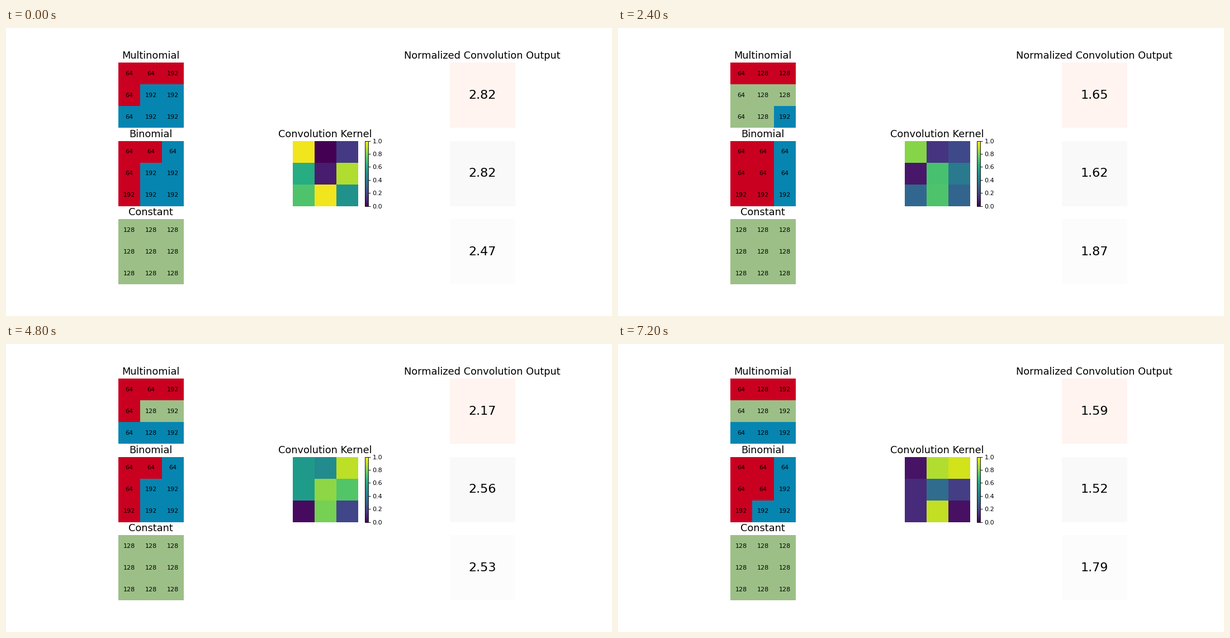
A matplotlib script that plays this animation: 1084 px wide and 517 px high, repeating every 8 s.

```python
import matplotlib.pyplot as plt
import numpy as np
from matplotlib.animation import FuncAnimation
from matplotlib.colors import ListedColormap

WIDTH, HEIGHT, DPI = 1084, 517, 80
INTERVAL, FRAMES, FRAMES_PER_STEP = 400, 20, 3
PALETTE = ListedColormap(["#ca0020", "#9cbf87", "#0685b1"])

# Each draw: multinomial low and middle counts, binomial low count, kernel in percent
DRAWS = [
    (4, 0, 4, [98, 0, 17, 62, 8, 88, 72, 98, 51]),
    (4, 3, 4, [73, 82, 20, 99, 15, 29, 16, 37, 49]),
    (3, 5, 6, [82, 15, 22, 6, 71, 41, 33, 72, 32]),
    (5, 2, 7, [90, 3, 34, 9, 50, 81, 30, 15, 34]),
    (4, 2, 4, [54, 48, 90, 55, 83, 73, 3, 79, 21]),
    (3, 3, 2, [99, 9, 86, 57, 37, 34, 77, 31, 66]),
    (3, 3, 5, [5, 88, 93, 12, 35, 18, 12, 91, 4]),
]

plt.rcParams["font.family"] = "DejaVu Sans"
fig = plt.figure(figsize=(WIDTH / DPI, HEIGHT / DPI), dpi=DPI, facecolor="white")


def panel(index, size, cmap, vmax, title=""):
    """Square heat map of size x size cells, row 0 on top."""
    ax = fig.add_subplot(3, 3, index)
    mesh = ax.pcolormesh(np.zeros((size, size)), cmap=cmap, vmin=0, vmax=vmax)
    ax.set_aspect("equal")
    ax.invert_yaxis()
    ax.axis("off")
    ax.set_title(title, fontsize=16)
    return ax, mesh


def label(ax, x, y, size):
    return ax.text(x + 0.5, y + 0.5, "", fontsize=size, ha="center", va="center")


class Grid:
    """Level map whose labels are the transpose of its colours."""

    def __init__(self, index, title):
        ax, self.mesh = panel(index, 3, PALETTE, 2, title)
        self.labels = [label(ax, x, y, 10) for x in range(3) for y in range(3)]

    def show(self, levels):
        self.mesh.set_array(levels)
        for text, level in zip(self.labels, levels.flat):
            text.set_text(str(64 * (level + 1)))


def output(index, color, title=""):
    ax, _ = panel(index, 1, ListedColormap([color]), 1, title)
    return label(ax, 0, 0, 20)


def sorted_levels(low, middle):
    return np.repeat([0, 1, 2], (low, middle, 9 - low - middle)).reshape(3, 3)


def convolve(kernel, levels):
    return (kernel * (levels + 1)).sum() / 4


multinomial = Grid(1, "Multinomial")
binomial = Grid(4, "Binomial")
constant = Grid(7, "Constant")

kernel_ax, kernel_mesh = panel(5, 3, "viridis", 1, "Convolution Kernel")
fig.colorbar(kernel_mesh, ax=kernel_ax, ticks=np.linspace(0, 1, 6))

outputs = [output(3, "#fff4f0", "Normalized Convolution Output"),
           output(6, "#f9f9f9"),
           output(9, "#fcfcfc")]


def update(frame):
    low, middle, binomial_low, percent = DRAWS[frame // FRAMES_PER_STEP]
    kernel = np.reshape(percent, (3, 3)) / 100
    samples = [sorted_levels(low, middle),
               sorted_levels(binomial_low, 0),
               sorted_levels(0, 9)]
    multinomial.show(samples[0])
    binomial.show(samples[1].T)
    constant.show(samples[2])
    kernel_mesh.set_array(kernel)
    for text, levels in zip(outputs, samples):
        text.set_text(f"{convolve(kernel, levels):.2f}")
    return []


anim = FuncAnimation(fig, update, frames=FRAMES, interval=INTERVAL,
                     repeat=True, repeat_delay=0, blit=False)
plt.show()
```
